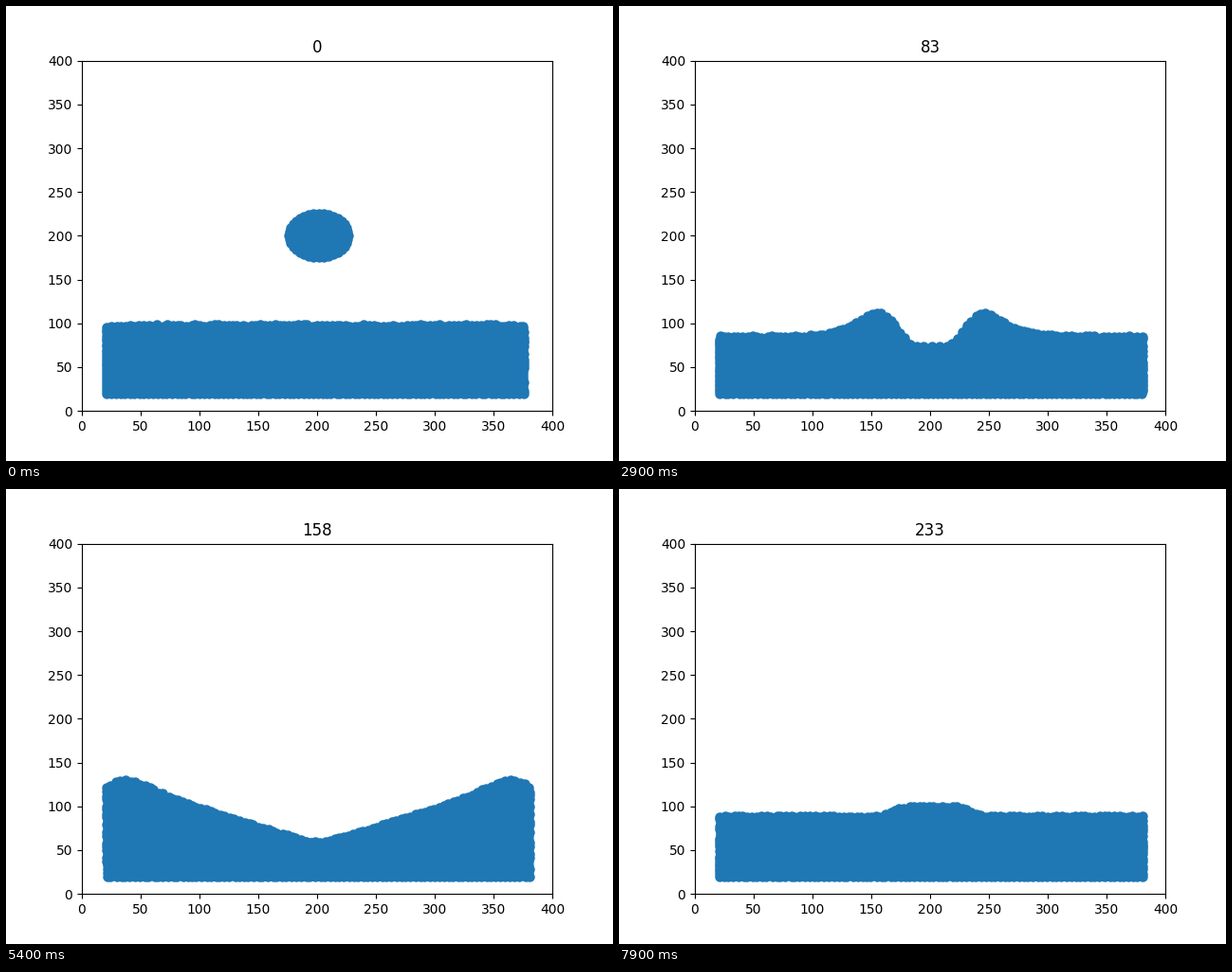
Animation of 640 by 480 pixels, one loop 8000 ms. Source, as a matplotlib script:

```python
import numpy as np
import matplotlib.pyplot as plt
from matplotlib.animation import FuncAnimation

FRAMES, INTERVAL = 80, 100
MID, HALF = 200.7, 180.3     # centre and half width of the tank
FLOOR = 20
PAD = 3.4                    # marker overhang above the top row
COLS, ROWS, RINGS = 90, 25, 6
IMPACT = 66                  # step at which the drop meets the pool


def ramp(n, start, end):
    t = np.clip((n - start) / (end - start), 0, 1)
    return t * t * (3 - 2 * t)


def bell(v, width):
    return np.exp(-(v / width) ** 2 / 2)


def surface(x, n):
    """Height of the water: one base shape melts into the next, waves on top."""
    d = np.abs(x - MID)
    edge = np.maximum(HALF - d, 0)
    crown = 85 + 1.5 * (n - 110)         # distance of the ring wave

    crater = 67 + 10.5 * (1 + np.tanh((d - 0.6 * crown) / 10))
    valley = 62 + 0.42 * (np.hypot(d, 8) - 8)
    piled = 73 + 54 * bell(edge, 38)
    h = 88 + 13 * np.exp(-n / 20) + 0 * d
    for shape, start, end in ((crater, IMPACT, 84), (valley, 118, 157),
                              (piled, 158, 185), (92, 186, 233)):
        h += (shape - h) * ramp(n, start, end)

    ring = 29 * ramp(n, IMPACT, 86) * (1 - ramp(n, 115, 180))
    h += ring / np.cosh((d - crown) / 16)

    t = np.clip((n - 185) / 48, 0, 1)    # central jet spreads into a plateau
    jet = ramp(n, 165, 187) * (19 - 8 * t + 8 * np.sin(np.pi * t))
    h += jet * np.exp(-(d / (15 + 20 * t)) ** (2 + 4 * t))

    corner = 14 * (bell(n - 23, 12) + bell(n - 158, 16))
    return h - corner * np.exp(-edge / 9)


rng = np.random.default_rng(4)
col, row = (g.ravel() for g in np.meshgrid(np.linspace(0, 1, COLS),
                                           np.linspace(0, 1, ROWS)))
phase_x, phase_y = rng.uniform(0, 2 * np.pi, (2, col.size))

# The drop: concentric rings of particles in a unit disc
radius = np.concatenate([np.full(6 * k, k / RINGS) for k in range(1, RINGS + 1)])
angle = np.concatenate([np.arange(6 * k) * np.pi / (3 * k) for k in range(1, RINGS + 1)])


def pool(n):
    left, right = 20.8, 375.5 + 5 * min(1, n / 20)
    x = left + (right - left) * col + 0.7 * np.sin(phase_x + 0.05 * n)
    x = np.clip(x, left, right)
    top = surface(x, n) - PAD
    y = FLOOR + (top - FLOOR + 0.7 * np.sin(phase_y + 0.06 * n)) * row
    return x, y


def drop(n):
    r = 25.2 + 1.2 * min(1, n / 23)
    y = 200.3 - 0.0217 * min(n, IMPACT) ** 2
    y = max(42, y - 2.6 * max(0, n - IMPACT))
    flat = ramp(n, IMPACT, 88)
    return (201.3 + r * (1 + 0.5 * flat) * radius * np.cos(angle),
            y + r * (1 - 0.6 * flat) * radius * np.sin(angle))


fig, ax = plt.subplots(figsize=(6.4, 4.8), dpi=100)
ax.set(xlim=(0, 400), ylim=(0, 400))
dots, = ax.plot([], [], "o", color="#1f77b4", markersize=6, markeredgewidth=1.5)
title = ax.set_title("0")


def update(frame):
    n = max(0, 3 * frame - 4)
    dots.set_data(*np.hstack([pool(n), drop(n)]))
    title.set_text(str(n))
    return dots, title


anim = FuncAnimation(fig, update, frames=FRAMES, interval=INTERVAL,
                     repeat=True, repeat_delay=0)
plt.show()
```
